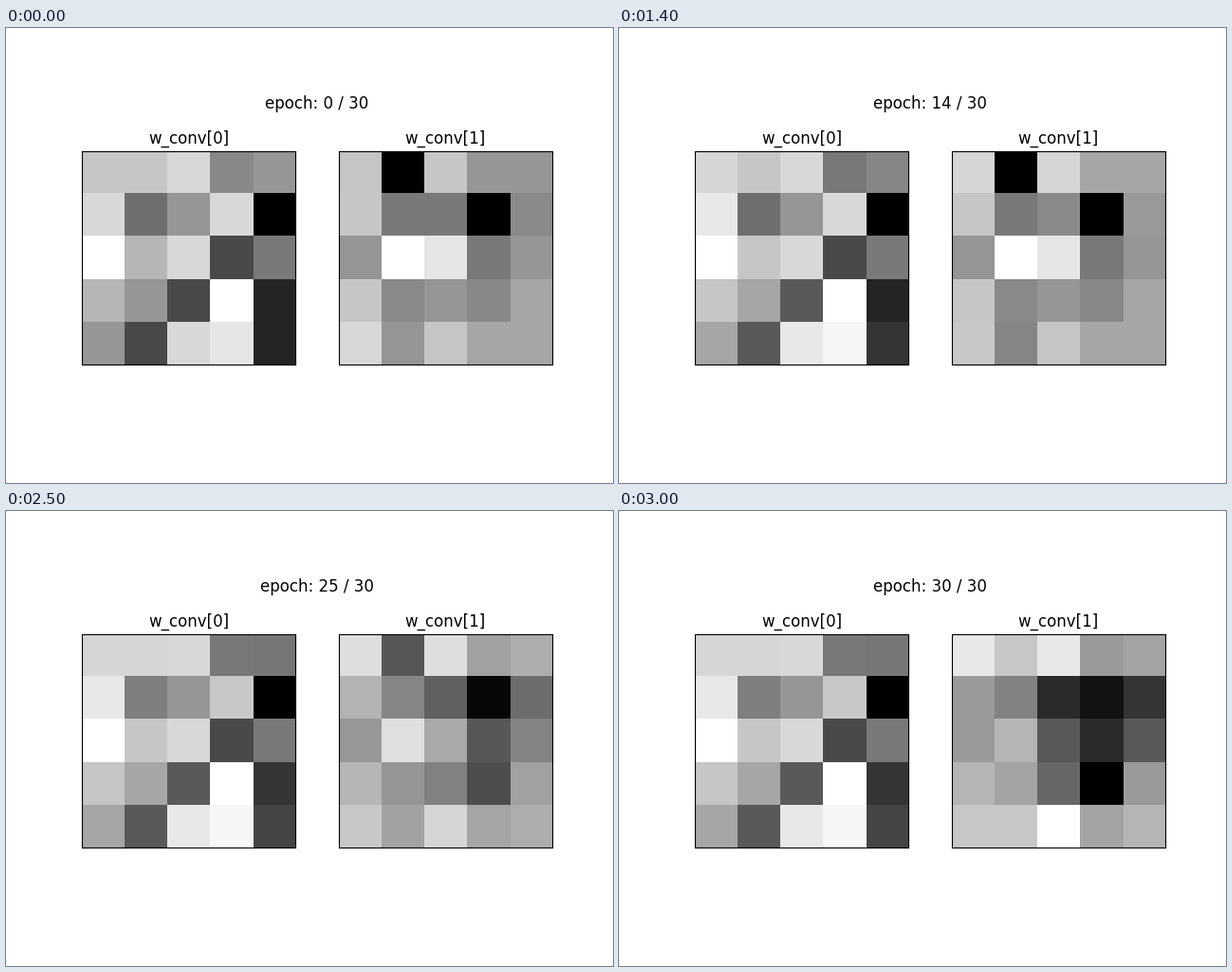
Recreate the animation shown at these times as a matplotlib script. Size 640x480 px, loop 3.1 s.

```python
import numpy as np
import matplotlib.pyplot as plt
from matplotlib.animation import FuncAnimation

EPOCHS = 30
DRIFT_END = 21       # the slow drift settles here
SHIFT = (22.5, 28)   # the second kernel reorganises between these epochs
GREY_STEP = 16

# Key poses: both kernels at the start, and the second one at the end
KERNEL_0 = np.array([[198, 198, 216, 136, 150],
                     [216, 110, 150, 216, 0],
                     [255, 182, 216, 74, 121],
                     [182, 150, 74, 255, 36],
                     [150, 74, 216, 230, 36]])
KERNEL_1 = np.array([[197, 0, 198, 150, 150],
                     [198, 121, 121, 0, 137],
                     [149, 255, 230, 121, 150],
                     [198, 137, 149, 136, 166],
                     [216, 149, 197, 166, 166]])
KERNEL_1_END = np.array([[232, 199, 232, 154, 164],
                         [154, 130, 42, 18, 52],
                         [154, 181, 88, 42, 88],
                         [181, 164, 103, 0, 154],
                         [199, 199, 255, 164, 181]])


def drift_field(top_left, top_right, bottom_left, bottom_right):
    """Bilinear 5x5 field between four corner values."""
    t = np.linspace(0, 1, 5)
    top = top_left + (top_right - top_left) * t
    bottom = bottom_left + (bottom_right - bottom_left) * t
    return top + (bottom - top) * t[:, None]


DRIFT_0 = drift_field(22, -32, 18, 24)
DRIFT_1 = drift_field(16, 26, -20, -4)


def drifted(kernel, drift, epoch):
    """Move greys in whole steps; pure black and white stay pinned."""
    amount = drift * min(epoch / DRIFT_END, 1)
    steps = np.round(amount / GREY_STEP) * GREY_STEP
    free = (kernel > 0) & (kernel < 255)
    return np.clip(kernel + steps * free, 0, 255)


def smoothstep(x, start, end):
    t = np.clip((x - start) / (end - start), 0, 1)
    return t * t * (3 - 2 * t)


def weights(epoch):
    first = drifted(KERNEL_0, DRIFT_0, epoch)
    second = drifted(KERNEL_1, DRIFT_1, epoch)
    second = second + (KERNEL_1_END - second) * smoothstep(epoch, *SHIFT)
    return first, second


plt.rcParams["font.family"] = "DejaVu Sans"
fig, axes = plt.subplots(1, 2, figsize=(6.4, 4.8), dpi=100, facecolor="white")
fig.subplots_adjust(left=0.125, right=0.9, bottom=0.11, top=0.88, wspace=0.2)

images = []
for i, (ax, grid) in enumerate(zip(axes, weights(0))):
    images.append(ax.imshow(grid, cmap="gray", vmin=0, vmax=255,
                            interpolation="nearest"))
    ax.set_title(f"w_conv[{i}]", fontsize=12)
    ax.set_xticks([])
    ax.set_yticks([])

# In cell units: centred between the panels, one cell above them
label = axes[0].text(5, -1.5, "", fontsize=12, ha="center", va="baseline")


def update(epoch):
    for image, grid in zip(images, weights(epoch)):
        image.set_data(grid)
    label.set_text(f"epoch: {epoch} / {EPOCHS}")
    return [*images, label]


anim = FuncAnimation(fig, update, frames=EPOCHS + 1, interval=100,
                     repeat=True, repeat_delay=0)
plt.show()
```
